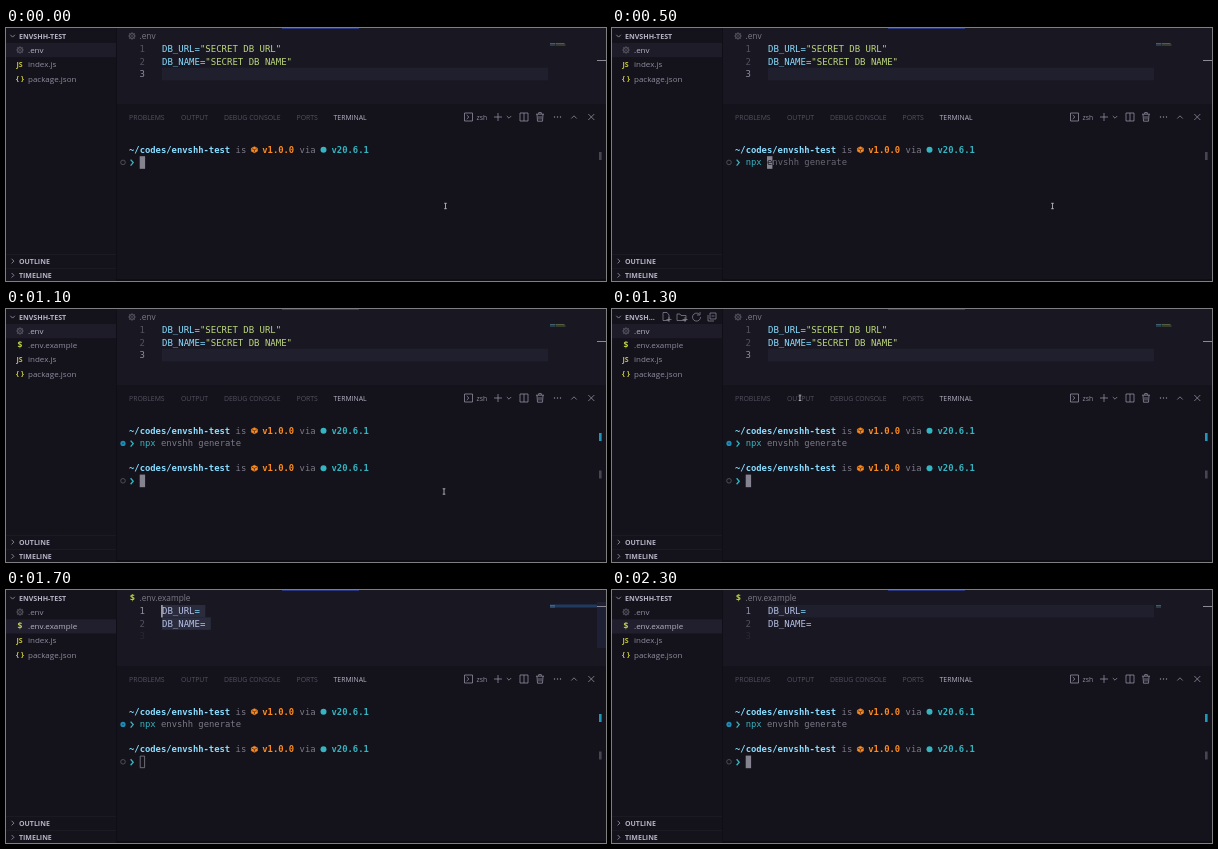
These frames come from a looping animation (600x253 px, 2400 ms). An HTML page with a canvas:

```html
<!DOCTYPE html>
<html lang="en">
<head>
<meta charset="utf-8">
<title>Terminal demo</title>
<style>
html, body { margin: 0; width: 100%; height: 100%; overflow: hidden; background: #14121b; }
canvas { display: block; width: 600px; height: 253px; }
</style>
</head>
<body>
<canvas id="stage"></canvas>
<script>
const canvas = document.getElementById('stage');
const ctx = canvas.getContext('2d');
const ratio = window.devicePixelRatio || 1;
canvas.width = 600 * ratio;
canvas.height = 253 * ratio;

const LOOP = 2400, STEP = 100;
const SANS = '"Open Sans", "Noto Sans", sans-serif';
const MONO = '"DejaVu Sans Mono", "Noto Sans Mono", monospace';
const CELL = 5.33, TERM_X = 123;
const CODE_X = 156, CODE_CELL = 5.418, CODE_LINE = 12.4;
const COMMAND = 'npx envshh generate';
const C = {
  side: '#14121b', editor: '#191822', panel: '#14121b', line: '#0e0d14',
  text: '#8f8d9f', dim: '#53515f', bright: '#b4b2c3', icon: '#908e9f',
  cyan: '#89ddff', plain: '#b4bfe4', teal: '#35b5c1', orange: '#ff8b1f', green: '#bcd77d',
  lime: '#b9cc4b', yellow: '#c2c240', gray: '#7c7a87', cursor: '#85838f'
};

function rect(x, y, w, h, color) {
  ctx.fillStyle = color;
  ctx.fillRect(x, y, w, h);
}

function text(str, x, y, color, size, weight = 400, family = SANS) {
  ctx.font = `${weight} ${size}px ${family}`;
  ctx.fillStyle = color;
  ctx.fillText(str, x, y);
}

function path(d, color, width = 0.9, fill) {
  const p = new Path2D(d);
  if (fill) {
    ctx.fillStyle = fill;
    ctx.fill(p);
  }
  ctx.strokeStyle = color;
  ctx.lineWidth = width;
  ctx.stroke(p);
}

function circle(x, y, r, color, filled) {
  ctx.beginPath();
  ctx.arc(x, y, r, 0, 7);
  ctx.fillStyle = ctx.strokeStyle = color;
  ctx.lineWidth = 0.8;
  filled ? ctx.fill() : ctx.stroke();
}

function gear(x, y) {
  const color = '#64646f';
  for (let i = 0; i < 8; i++) {
    const a = i * Math.PI / 4, c = Math.cos(a), s = Math.sin(a);
    path(`M${x + 2.4 * c} ${y + 2.4 * s}L${x + 3.6 * c} ${y + 3.6 * s}`, color, 1.2);
  }
  circle(x, y, 2.4, color);
  circle(x, y, 0.8, color, true);
}

function sidebar(s) {
  rect(0, 0, 110, 253, C.side);
  path('M4.3 6.8l2.3 2.3 2.3-2.3', C.text);
  text(s.hover ? 'ENVSH…' : 'ENVSHH-TEST', 13, 10.6, C.bright, 7.1, 700);
  if (s.hover) {
    path('M55 3.5h-4v8h6V6zM57 8v5M54.5 10.5h5', C.icon, 0.7);
    path('M65 5h3l1 1.5h5v5h-9zM73 8v5M70.5 10.5h5', C.icon, 0.7);
    path('M87 5A4 4 0 1 0 88.5 8M88 3v3h-3', C.icon, 0.7);
    path('M98 4h6v6h-6zM96 6v6h6M99.5 7h3', C.icon, 0.7);
  }

  if (s.opened) rect(0, 29.3, 110, 14.2, '#211f2d');
  else rect(0, 15, 110, 14.2, '#1e1c29');
  gear(14, 22);
  text('.env', 22, 25, s.opened ? C.text : C.bright, 8);
  let y = 39.3;
  if (s.done) {
    text('$', 11.4, y, C.lime, 8.5, 700);
    text('.env.example', 22, y, s.opened ? C.bright : C.text, 8);
    y += 14.1;
  }
  text('JS', 10.5, y, C.yellow, 7, 700);
  text('index.js', 22, y, C.text, 8);
  y += 14.3;
  text('{ }', 10, y - 0.4, C.yellow, 7.5, 700);
  text('package.json', 22, y, C.text, 8);

  ['OUTLINE', 'TIMELINE'].forEach((label, i) => {
    const top = 226 + i * 14.2;
    rect(0, top, 110, 0.8, '#1d1b25');
    path(`M5.6 ${top + 4.8}l2.3 2.3-2.3 2.3`, C.text);
    text(label, 13, top + 9.7, C.bright, 7, 700);
  });
}

function code(str, x, y, color) {
  text(str, x, y, color, 9, 400, MONO);
}

function editor(s) {
  rect(110, 0, 490, 77, C.editor);
  rect(276, 0, 77, 1, '#2b3680');
  if (s.opened) text('$', 124, 11, C.lime, 8.5, 700);
  else gear(126, 8);
  text(s.opened ? '.env.example' : '.env', 133.5, 10.8, C.gray, 8.3);

  const lines = [['DB_URL', '"SECRET DB URL"'], ['DB_NAME', '"SECRET DB NAME"']];
  const active = s.opened ? 0 : 2;
  if (!s.selected) rect(CODE_X, 15 + active * CODE_LINE, 386, CODE_LINE, '#1f1f2d');
  if (s.selected) {
    // The selection takes in the "=" and the line break
    lines.forEach(([key], i) =>
      rect(CODE_X, 15 + i * CODE_LINE, (key.length + 2) * CODE_CELL, CODE_LINE, '#2a2c3d'));
    rect(544, 14.5, 56, 3, '#203a60');
    rect(591, 12, 9, 46, '#1e2133');
  }

  for (let i = 0; i < 3; i++) {
    const faint = s.opened && i === 2;
    code(i + 1, 133.5, 24.2 + i * CODE_LINE, faint ? '#292832' : i === active ? C.text : C.dim);
  }
  lines.forEach(([key, value], i) => {
    const y = 24.2 + i * CODE_LINE, end = CODE_X + key.length * CODE_CELL;
    code(key, CODE_X, y, s.opened ? C.plain : C.cyan);
    code('=', end, y, C.cyan);
    if (!s.opened) code(value, end + CODE_CELL, y, C.green);
    rect(544, 15 + i * 1.6, 5, 0.8, '#487384');
    if (!s.opened) rect(549.5, 15 + i * 1.6, 9 + i, 0.8, '#627145');
  });
  if (s.selected) rect(155.3, 15, 1.2, CODE_LINE, '#d0d0dc');
  rect(591, s.opened ? 16 : 32, 9, 1, '#8b8996');
}

function tabs(s) {
  rect(110, 77, 490, 176, C.panel);
  rect(110, 76, 490, 1, '#14121b');
  [['PROBLEMS', 123], ['OUTPUT', 175], ['DEBUG CONSOLE', 218], ['PORTS', 290.5], ['TERMINAL', 327.5]]
    .forEach(([label, x]) => text(label, x, 91.6, label === 'TERMINAL' ? C.bright : C.dim, 6.9));

  const x = s.running ? 454 : 458;
  path(`M${x + 0.5} 85h8v8h-8zM${x + 2.7} 87l2.2 2-2.2 2`, C.icon, 0.8);
  text(s.running ? 'npm' : 'zsh', s.running ? 466.5 : 470.5, 91.5, C.icon, 6.8);
  path('M488 89h8M492 85v8M500.8 88l2.2 2.2 2.2-2.2', C.icon, 0.8);
  path('M514 85h8v8h-8zM518 85v8', C.icon, 0.8);
  path('M530 86.2h8M532.7 86v-1.4h2.6V86M531 86.2l.5 7h5l.5-7M533 88v3.5M535 88v3.5', C.icon, 0.8);
  for (let i = -1; i < 2; i++) circle(551.5 + i * 3, 89, 0.7, C.icon, true);
  path('M565.3 90.5l2.7-2.7 2.7 2.7M582.3 86l6 6M588.3 86l-6 6', C.icon, 0.8);
}

function term(str, col, y, color, weight = 400, x = TERM_X) {
  text(str, x + col * CELL, y, color, CELL / 0.602, weight, MONO);
}

function prompt(y) {
  term('~/codes/envshh-test', 0, y, C.cyan, 700);
  term('is', 20, y, C.gray);
  const x = 248.4, m = y - 3;
  path(`M${x} ${m - 3}l3 1.5v3l-3 1.5-3-1.5v-3z`, C.orange, 0.6, C.orange);
  path(`M${x - 2.4} ${m - 1}l2.4 1 2.4-1M${x} ${m}v2.3`, C.panel, 0.6);
  term('v1.0.0', 25, y, C.orange, 700);
  term('via', 32, y, C.gray);
  circle(317.5, m, 3, C.teal, true);
  term('v20.6.1', 38, y, C.teal, 700);
  path(`M124.6 ${y + 6.9}l2.6 3-2.6 3`, C.teal, 1.3);
}

function block(x, y, hollow) {
  if (hollow) path(`M${x + 0.5} ${y + 0.5}h4.4v11.6h-4.4z`, C.cursor, 0.8);
  else rect(x, y, 5.4, 12.6, C.cursor);
}

function terminal(s) {
  prompt(124.7);
  const x = 133.7, y = 137.4;
  const grey = s.typed < COMMAND.length ? '#696872' : C.gray;
  const typing = !s.running && !s.done;
  if (typing) block(x + s.typed * CELL, 128.2);
  if (s.typed) {
    [...COMMAND].forEach((ch, i) => {
      const color = typing && i === s.typed ? C.panel : i < 3 && i < s.typed ? C.teal : grey;
      term(ch, i, y, color, 400, x);
    });
  }
  if (s.running) block(TERM_X, 140.8);

  if (s.done) {
    circle(117, 134.4, 2.6, '#1f8db4', true);
    circle(117, 134.4, 0.9, '#125a78', true);
    prompt(162.3);
    circle(117, 171.8, 2.3, '#5c5a66');
    block(x, 165.6, s.blurred);
    rect(593, 124, 2.6, 8, '#2196ba');
    rect(593, 161.5, 2.6, 8, '#474551');
  } else {
    circle(117, 134.4, 2.3, '#5c5a66');
    rect(593, 124, 2.6, 8, '#474551');
  }
  rect(110, 251, 490, 2, C.line);
}

// Pointer stops: time, x, y
const STOPS = [[0, 439.5, 178], [500, 440.5, 178], [600, 440.5, 178], [900, 438, 182.5],
  [1100, 438, 182.5], [1400, 63, 42], [1500, 63, 42], [1700, 156.3, 21]];

function pointer(t) {
  if (t >= 1700) return;
  const i = STOPS.findIndex(stop => stop[0] > t) - 1;
  const [t0, x0, y0] = STOPS[i], [t1, x1, y1] = STOPS[i + 1];
  const k = (t - t0) / (t1 - t0);
  const x = x0 + (x1 - x0) * k, y = y0 + (y1 - y0) * k;
  if (x < 110) {
    path(`M${x - 1.4} ${y + 2.5}l-1.4-2 1-.7.8.8v-4h1.1v2.5l3 .7v1.8l-.8 2h-2.6z`, '#ddd', 0.6, '#25232d');
  } else {
    path(`M${x - 1.3} ${y - 2.7}h2.6M${x} ${y - 2.7}v5.4M${x - 1.3} ${y + 2.7}h2.6`, '#c8c7cf', 0.8);
  }
}

function draw(now) {
  const t = Math.floor(now % LOOP / STEP) * STEP;
  const state = {
    typed: t >= 600 ? COMMAND.length : Math.min(4, t / STEP),
    running: t >= 700 && t < 1100,
    done: t >= 1100,
    hover: t >= 1300 && t < 1600,
    opened: t >= 1400,
    blurred: t >= 1400 && t < 2100,
    selected: t >= 1700 && t < 2000
  };
  ctx.setTransform(ratio, 0, 0, ratio, 0, 0);
  sidebar(state);
  editor(state);
  tabs(state);
  terminal(state);
  rect(110, 0, 0.8, 253, C.line);
  pointer(t);
  requestAnimationFrame(draw);
}
requestAnimationFrame(draw);
</script>
</body>
</html>
```
